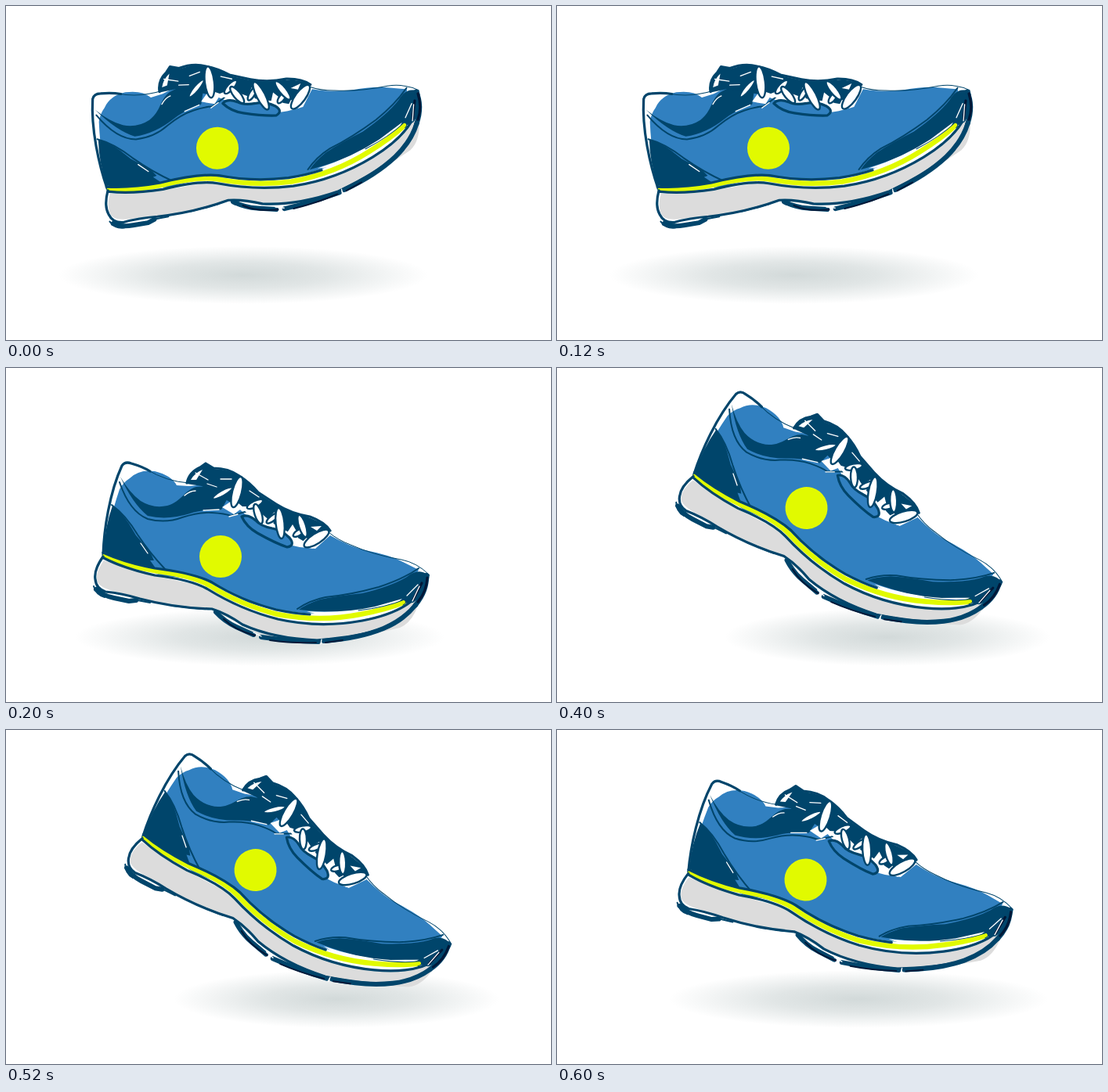
These frames come from a looping animation (696x427 px, 800 ms). An HTML page:

```html
<!DOCTYPE html>
<html lang="en">
<head>
<meta charset="utf-8">
<title>Running shoe</title>
<style>
  html, body { margin: 0; width: 100%; height: 100%; overflow: hidden; background: #fff; }
  svg { display: block; width: 100vw; height: 100vh; }
  .blue { fill: #3180c0; }
  .navy { fill: #00456b; }
  .white { fill: #fff; }
  .grey { fill: #dcdcdc; }
  .line, .thin, .hair, .sole, .scratch, .lime { fill: none; stroke-linecap: round; stroke-linejoin: round; }
  .line { stroke: #00456b; stroke-width: 3.2; }
  .thin { stroke: #00456b; stroke-width: 2; }
  .hair { stroke: #00456b; stroke-width: 1; }
  .sole { stroke: #00456b; stroke-width: 6; }
  .scratch { stroke: #fff; stroke-width: 1.3; }
  .lime { stroke: #e1fa00; stroke-width: 6.5; }
  .ink { stroke: #001838; }
  #laces ellipse { fill: #fff; stroke: #00456b; stroke-width: 2.4; }
</style>
</head>
<body>
<svg viewBox="0 0 696 427">
  <defs>
    <radialGradient id="soft">
      <stop offset="0" stop-color="#829696" stop-opacity=".36"/>
      <stop offset=".45" stop-color="#829696" stop-opacity=".24"/>
      <stop offset="1" stop-color="#829696" stop-opacity="0"/>
    </radialGradient>
  </defs>
  <ellipse id="shadow" cy="344" ry="37" fill="url(#soft)"/>

  <g id="shoe">
    <!-- white base of the upper and sole -->
    <path class="white" d="M124 240C126 205 136 147 148 124Q152 119 160 121Q180 127 205 143L232 147Q237 130 255 123L297 137L345 178L414 208Q430 224 470 239L515 248L540 264L525 305Q490 336 400 349Q320 347 268 312L165 295Q110 288 113 265Z"/>

    <!-- midsole -->
    <path class="grey" d="M125 246Q113 262 117 274Q122 283 150 288L172 296Q220 307 265 309Q300 331 350 347Q400 352 460 342L503 332Q518 326 526 304L530 292Q480 325 400 328Q340 325 296 302Q270 283 245 277Q180 266 125 246Z"/>

    <!-- upper -->
    <path class="blue" d="M145 155Q150 146 158 141Q170 129 190 132Q211 137 218 150L234 151L262 148L300 182Q342 224 375 229L395 231L414 214Q438 228 459 233Q490 239 507 248L527 258L510 290Q450 312 400 314Q350 313 310 300L270 280Q235 267 200 266L129 238Q128 205 145 155Z"/>

    <!-- heel counter -->
    <path class="navy" d="M136 176Q148 185 157 199L166 214L184 235L189 246L184 246L194 260Q155 249 125 235Q126 204 136 176Z"/>
    <path class="scratch" d="M172 224l9 13M166 252l21 7"/>
    <path class="thin" d="M135 175Q153 188 168 213Q186 240 207 261"/>

    <!-- collar -->
    <path class="navy" d="M146 139Q158 160 172 170Q188 180 206 176C224 171 228 156 243 152Q260 150 272 155L284 165L275 181Q250 181 235 186Q206 195 181 189Q162 174 146 139Z"/>
    <path class="thin" d="M145 146Q158 184 181 193Q204 199 225 191Q246 184 263 185Q280 186 287 189L312 182"/>
    <path class="scratch" d="M228 163q7 -6 14 -6M252 182l20 -1M267 162l11 2M285 190l11 -3"/>
    <path class="line" d="M124 239C125 207 132 160 148 125Q152 119 160 122Q174 126 184 132"/>
    <path class="hair" d="M180 130Q205 145 233 147"/>

    <!-- tongue and lacing -->
    <path class="navy" d="M231 148Q235 132 249 126L255 122L266 129Q287 130 300 139L326 163L343 174Q365 184 389 192Q407 199 415 208L404 211L381 222L361 210L340 198L316 177L295 177L272 163L250 151Z"/>
    <path class="white" d="M236 143Q241 134 251 130L243 143ZM276 178L291 168L303 178L291 187ZM304 182L313 177L324 192L321 197ZM333 194L343 184L341 203ZM358 212L366 200L374 214L369 224ZM389 203L403 202L397 208ZM374 226L384 217L392 231Z"/>
    <path class="scratch" d="M242 134l16 9M257 148l12 4M274 142l14 0M311 157l12 8"/>
    <path class="line" d="M231 147Q234 133 248 127L255 122L265 128Q284 128 298 138Q311 146 322 159L345 174Q364 186 388 190Q407 197 414 208"/>
    <path class="line" style="fill:#3180c0" d="M301 190Q307 203 321 211Q344 224 359 229Q370 227 362 217Q352 207 340 205Q325 202 319 195Q309 186 301 190Z"/>
    <g id="laces"></g>

    <!-- side badge -->
    <circle cx="274" cy="241" r="27" fill="#e1fa00"/>

    <!-- toe cap -->
    <path class="hair" d="M412 210Q424 220 440 226Q469 239 505 245Q525 249 540 264"/>
    <path class="navy" d="M374 309Q383 302 401 296Q425 291 455 288Q492 279 512 267Q523 258 532 261L541 264Q539 286 520 300Q490 302 456 309Q419 314 374 309Z"/>
    <path class="white" d="M384 311Q430 314 471 305L506 295L500 300Q450 315 408 318Z"/>
    <path class="thin" d="M372 308Q388 297 408 293Q440 290 476 280Q507 270 527 256"/>
    <path class="scratch" d="M512 291l14 -14"/>

    <!-- foxing stripe -->
    <path class="lime" d="M126 241Q157 254 195 260Q240 266 260 278Q300 303 347 315Q402 325 452 315Q485 309 507 300"/>
    <path class="line" d="M124 236Q153 249 190 256Q239 262 263 274Q299 297 345 309Q368 314 388 315"/>
    <path class="line" d="M125 243Q150 256 190 265Q238 271 258 283Q300 309 347 321Q400 333 455 323Q508 313 528 288"/>
    <path class="hair" d="M450 310Q485 306 509 296Q513 300 507 303"/>

    <!-- outsole -->
    <path class="line" d="M124 241Q112 258 114 270Q115 282 127 286Q148 288 171 295Q216 307 263 308Q282 314 302 328Q342 346 397 348Q461 343 488 330Q516 317 531 288"/>
    <path class="sole" d="M115 283Q123 291 138 294L157 298L166 297"/>
    <path class="thin" d="M112 279Q115 290 126 293M168 297L184 300M213 304L250 308"/>
    <path class="sole" d="M268 312Q279 324 294 331L316 341"/>
    <path class="sole" d="M326 344Q360 349 399 350M406 349Q450 346 482 333Q508 322 523 303"/>
    <path class="thin ink" d="M278 321Q292 335 318 342M337 348Q365 352 396 351M408 351L430 348"/>
    <path class="scratch" d="M316 338l10 5M403 347l-1 6"/>
    <path class="sole" d="M537 265Q538 285 523 303"/>
    <path class="line ink" d="M538 268Q537 286 526 299M531 275L520 296"/>
    <path class="scratch" d="M528 279l-9 19"/>
  </g>
</svg>
<script>
  const STEP = 200;
  // shoe centre, tilt in degrees, shadow centre and half width
  const poses = [
    { x: 310.5, y: 134, tilt: -21.1, sx: 303, rx: 236 },
    { x: 329, y: 211, tilt: 0, sx: 324, rx: 236 },
    { x: 379.6, y: 165, tilt: 15.7, sx: 422, rx: 208 },
    { x: 374, y: 164.5, tilt: 3.1, sx: 385, rx: 242 }
  ];
  const shoe = document.getElementById("shoe");
  const shadow = document.getElementById("shadow");

  // each lace: start, end, width
  const laces = [
    [264, 167, 289, 153, 7], [300, 139, 290, 178, 12],
    [308, 179, 328, 169, 8], [318, 174, 326, 199, 9],
    [333, 198, 348, 186, 7], [348, 179, 352, 218, 11],
    [367, 215, 381, 206, 7], [374, 188, 383, 216, 9],
    [381, 228, 412, 208, 13]
  ];
  const lace = ([x1, y1, x2, y2, width]) => {
    const dx = x2 - x1, dy = y2 - y1;
    const turn = Math.atan2(dy, dx) * 180 / Math.PI;
    return `<ellipse rx="${Math.hypot(dx, dy) / 2}" ry="${width / 2}"
      transform="translate(${(x1 + x2) / 2} ${(y1 + y2) / 2}) rotate(${turn})"/>`;
  };
  document.getElementById("laces").innerHTML = laces.map(lace).join("");

  function draw(now) {
    const p = poses[Math.floor(now / STEP) % poses.length];
    shoe.setAttribute("transform", `translate(${p.x} ${p.y}) rotate(${p.tilt}) translate(-329 -211)`);
    shadow.setAttribute("cx", p.sx);
    shadow.setAttribute("rx", p.rx);
  }

  const start = performance.now();
  function tick() {
    draw(performance.now() - start);
    requestAnimationFrame(tick);
  }
  tick();
</script>
</body>
</html>
```
